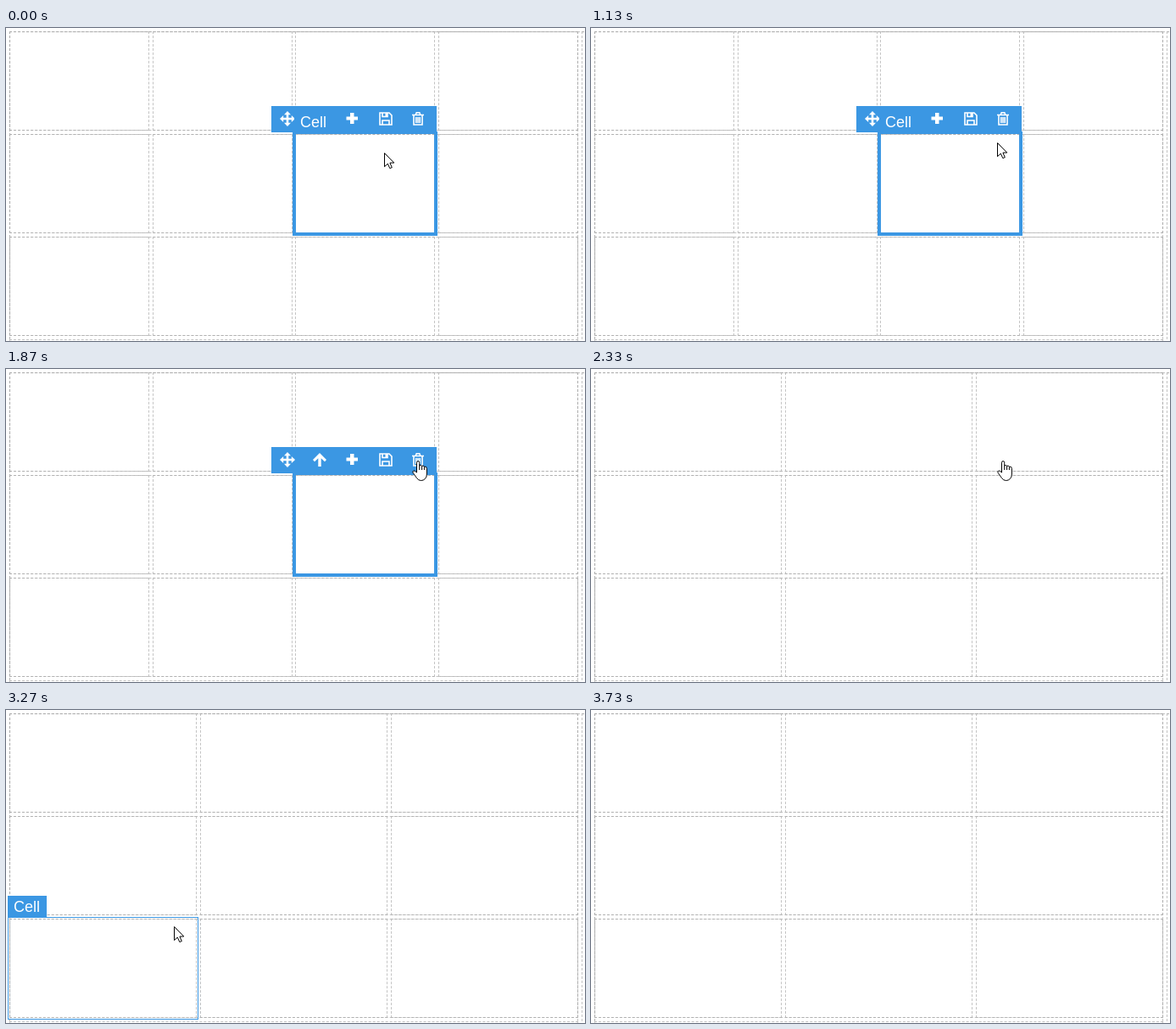
Recreate the animation shown at these times as an HTML page. Size 683x369 px, loop 4270 ms.

```html
<!DOCTYPE html>
<html lang="en">
<head>
<meta charset="utf-8">
<title>Grid cell removal</title>
<style>
  html, body { margin: 0; width: 100%; height: 100%; overflow: hidden; background: #fff; }
  #stage { position: relative; width: 683px; height: 369px; overflow: hidden; }
  #stage i { position: absolute; box-sizing: border-box; border: 1px dashed rgba(170, 170, 170, .7); }
  svg { position: absolute; left: 0; top: 0; }
  text { font: 18px "Liberation Sans", Arial, sans-serif; fill: #fff; }
  .blue { fill: #3b97e3; }
  .icon { fill: #fff; }
  .line { fill: none; stroke: #fff; stroke-width: 1.6; }
  .pointer { fill: #fff; stroke: #000; stroke-linejoin: round; }
</style>
</head>
<body>
<div id="stage">
  <div id="frame"></div>
  <div id="four"></div>
  <div id="three"></div>
  <svg width="683" height="369" viewBox="0 0 683 369">
    <g id="selection">
      <path class="blue" fill-rule="evenodd" d="M338 122H509V245H338ZM342 125V241H505V125Z"/>
      <rect class="blue" x="313" y="92" width="195" height="31"/>
      <path class="icon" d="M332 98l4 4.200h-2.700v3.500h3.500v-2.700l4.200 4-4.200 4v-2.700h-3.500v3.500h2.700l-4 4.200-4-4.200h2.700v-3.500h-3.500v2.700l-4.200-4 4.200-4v2.700h3.500v-3.500h-2.700Z"/>
      <path class="icon" d="M370 99l8 8-2 2.200-4.300-4V115h-3.400v-9.800l-4.300 4-2-2.200Z"/>
      <path class="icon" d="M406 100h4.500v4.500h4.500v4h-4.500v4.500h-4.500v-4.500h-4.500v-4h4.500Z"/>
      <path class="line" d="M441 100H452L455 103V114H441ZM444 114V109H452V114M444 100V104.500H450V100"/>
      <rect class="icon" x="447.500" y="100" width="2" height="4"/>
      <path class="line" d="M479 102.500H493M481 103V114H491V103M483.300 102L484.200 99.800H487.800L488.700 102"/>
      <path class="line" stroke-width="1.200" d="M483.800 105V112M486 105V112M488.200 105V112"/>
      <g id="tag">
        <rect class="blue" x="340" y="98" width="46" height="25"/>
        <text x="347" y="117">Cell</text>
      </g>
    </g>
    <g id="hover">
      <rect fill="none" stroke="#3b97e3" x=".5" y=".5" width="224" height="120"/>
      <rect class="blue" y="-25" width="46" height="25"/>
      <text x="7" y="-6">Cell</text>
    </g>
    <path id="arrow" class="pointer" d="M.5 .5V16.500L4.300 13L6.800 18.500L9.300 17.500L6.900 12H11.800Z"/>
    <g id="hand" class="pointer">
      <path d="M5.500 14V2.300Q5.700 .6 7.100 .6Q8.600 .6 8.700 2.300V6Q10.200 4.700 11.600 6.300Q13.200 5.300 14.400 7.100Q17.300 6.500 17.400 9.300V16Q17.400 19.500 15.300 21.500Q13.500 23.500 10.500 23.500Q7.500 23.500 5.500 20.500L1.200 14.500Q.2 12.500 1.800 11.900Q3.300 11.700 5.500 14Z"/>
      <path fill="none" d="M8.700 6V11M11.600 6.300V11M14.400 7.100V11"/>
    </g>
  </svg>
</div>
<script>
const LOOP = 4270, TICK = 1000 / 15;
const ROW_PITCH = 121, ROW_HEIGHT = 117, EDGE = 4, RIGHT = 675;
const $ = id => document.getElementById(id);

function box(parent, left, top, right, bottom) {
  const el = document.createElement('i');
  Object.assign(el.style, {
    left: left + 'px', top: top + 'px',
    width: right - left + 'px', height: bottom - top + 'px'
  });
  parent.append(el);
}

function buildCells(parent, columns, width) {
  const pitch = (RIGHT - EDGE - width) / (columns - 1);
  for (let row = 0; row < 3; row++) {
    const top = EDGE + row * ROW_PITCH;
    for (let col = 0; col < columns; col++) {
      const left = Math.round(EDGE + col * pitch);
      box(parent, left, top, Math.round(EDGE + col * pitch + width), top + ROW_HEIGHT);
    }
  }
}

// The page goes on beyond the stage: a wide section holding two tall columns.
function buildFrame() {
  const frame = $('frame'), pageRight = 2007, pageBottom = 1007;
  box(frame, EDGE, EDGE, pageRight, pageBottom);
  box(frame, EDGE, EDGE, RIGHT, pageBottom);
  box(frame, 679, EDGE, 1350, pageBottom);
  for (let row = 0; row < 4; row++) {
    const top = EDGE + row * ROW_PITCH;
    box(frame, EDGE, top, RIGHT, top + ROW_HEIGHT);
  }
}

// Pointer strokes: start tick, then one position per tick; the last one holds.
const strokes = [
  [0, [446, 147]],
  [13, [449, 146], [456, 144], [464, 141], [472, 138], [479, 135], [483, 129], [485, 122], [485, 117], [485, 114], [485, 111]],
  [28, [485, 108]],
  [41, [483, 113], [479, 120], [473, 128], [464, 137], [453, 147], [405, 167], [345, 191], [275, 221],
    [198, 255], [202, 280], [258, 296], [345, 306], [432, 317], [510, 331], [565, 350]]
];

function pointerAt(tick) {
  const [start, ...points] = strokes.filter(s => s[0] <= tick).pop();
  return points[Math.min(tick - start, points.length - 1)];
}

const show = (id, on) => $(id).style.display = on ? '' : 'none';
const place = (id, x, y) => $(id).setAttribute('transform', `translate(${x} ${y})`);

function render(time) {
  const tick = Math.floor((time % LOOP + 5) / TICK);
  const [x, y] = pointerAt(tick);
  const deleted = tick >= 35, gone = tick >= 56;
  const pointing = tick >= 19 && tick < 41;

  show('four', !deleted);
  show('three', deleted);
  show('selection', !deleted);
  show('tag', !pointing);

  show('arrow', !pointing && !gone);
  show('hand', pointing);
  place('arrow', x, y);
  place('hand', x - 6, y);

  const col = Math.floor((x - 2) / 225), row = Math.floor((y - 2) / ROW_PITCH);
  show('hover', tick >= 41 && !gone && row > 0);
  place('hover', 2 + col * 225, 2 + row * ROW_PITCH);
}

buildFrame();
buildCells($('four'), 4, 165);
buildCells($('three'), 3, 221);

const begin = performance.now();
function loop() {
  render(performance.now() - begin);
  requestAnimationFrame(loop);
}
loop();
</script>
</body>
</html>
```
